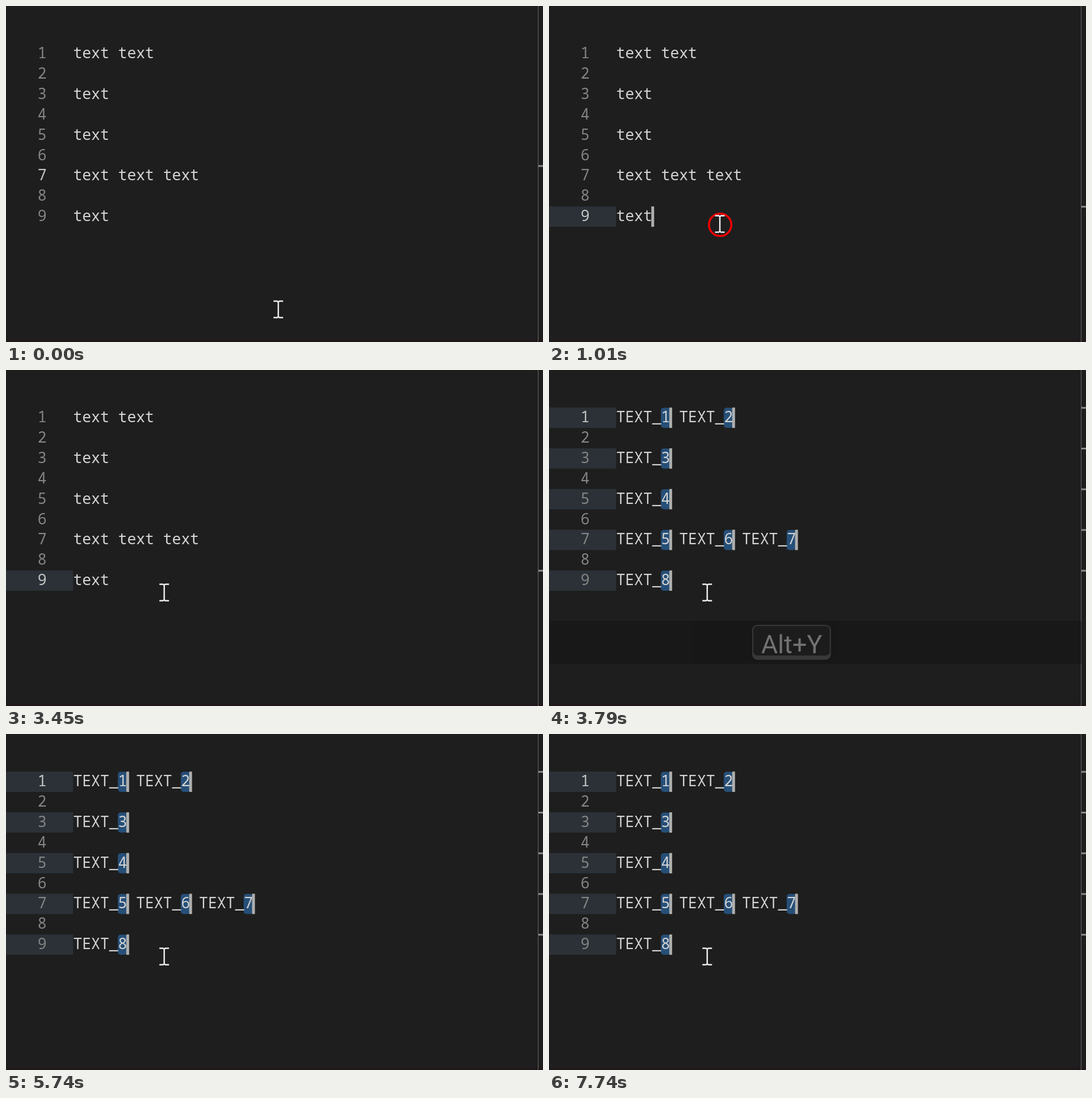
An HTML page that plays this animation: 946 by 592 pixels, repeating every 8 s.

```html
<!DOCTYPE html>
<html>
<head>
<meta charset="utf-8">
<style>
html, body { margin: 0; width: 100%; height: 100%; overflow: hidden; background: #1e1e1e; }
svg { display: block; }
text { white-space: pre; }
.code { font: 26.4px "Noto Sans Mono", monospace; fill: #d4d4d4; }
.num { fill: #858585; }
.active { fill: #c6c6c6; }
.caret { fill: #aeafad; }
.key { font: 45px Roboto, sans-serif; fill: #f0f0f0; text-anchor: middle; }
</style>
</head>
<body>
<svg width="946" height="592" viewBox="0 0 946 592">
  <rect y="588" width="946" height="4" fill="#21181c"/>
  <rect x="937" width="1" height="592" fill="#686868"/>
  <g id="idle"></g>
  <g id="focused"></g>
  <g id="numbered"></g>
  <g id="overlay">
    <rect y="442" width="938" height="75.5" fill="#0f0f0f"/>
    <rect x="358" y="449" width="138.5" height="61.5" rx="9" fill="#606060"/>
    <rect x="360" y="451" width="134.5" height="52" rx="7" fill="#1b1b1b"/>
    <text class="key" x="427.5" y="498.5">Alt+Y</text>
  </g>
  <circle id="click" cx="301.5" cy="385.5" r="19.7" fill="none" stroke="#f00000" stroke-width="3.6"/>
  <path id="pointer" d="M-8.5-14.5H-2L0-13 2-14.5H8.5M0-13V13M-8.5 14.5H-2L0 13 2 14.5H8.5" fill="none" stroke="#eee" stroke-width="2.5"/>
</svg>
<script>
const $ = id => document.getElementById(id);
const LEFT = 118.4, CHAR = 15.83, TOP = 66.2, LINE = 35.87;
const colX = col => LEFT + col * CHAR;
const lineY = i => TOP + i * LINE;

const rect = (x, y, w, h, attrs) => `<rect x="${x}" y="${y}" width="${w}" height="${h}" ${attrs}/>`;
const text = (x, y, cls, s) => `<text x="${x}" y="${y}" class="code ${cls}">${s}</text>`;

// marked: lines with a ruler mark; carets: [line, column] pairs
function editor(lines, { active, marked, lit, carets = [], selected }) {
  let out = '';
  lines.forEach((s, i) => {
    const y = lineY(i);
    if (marked.includes(i)) {
      out += rect(938, y - 1, 8, 3, 'fill="#8c8c8c"');
      if (lit) out += rect(0, y, 118.3, LINE, 'fill="#2b3137"');
    }
    out += text(55.7, y + 26, i === active ? 'active' : 'num', i + 1);
  });
  if (selected) for (const [i, col] of carets)
    out += rect(colX(col - 1) - .5, lineY(i) + .3, CHAR + .7, LINE - .3, 'rx="5" fill="#264f78"');
  lines.forEach((s, i) => { out += text(LEFT, lineY(i) + 26, '', s); });
  out += '<g class="caret">';
  for (const [i, col] of carets) out += rect(colX(col) - 1.5, lineY(i), 5, LINE, '');
  return out + '</g>';
}

const plain = ['text text', '', 'text', '', 'text', '', 'text text text', '', 'text'];
let count = 0;
const changed = plain.map(s => s.replace(/text/g, () => 'TEXT_' + ++count));
const ends = changed.flatMap((s, i) => [...s.matchAll(/\d/g)].map(m => [i, m.index + 1]));

$('idle').innerHTML = editor(plain, { active: 6, marked: [6] });
$('focused').innerHTML = editor(plain, { active: 8, marked: [8], lit: true, carets: [[8, 4]] });
$('numbered').innerHTML = editor(changed, { active: 0, marked: [0, 2, 4, 6, 8], lit: true, carets: ends, selected: true });

const show = (el, on) => el.setAttribute('visibility', on ? 'inherit' : 'hidden');
const blinks = [1470, 1930, 2460, 2920, 3450, 3720, 4280, 4810, 5270, 5740, 6270, 6730, 7280, 7740];

function pointerAt(t) {
  if (t >= 1270) return [278.7, 392];
  const step = t < 70 ? 0 : Math.min(7, Math.floor((t - 70) / 65) + 1) / 7;
  const p = step * step * (3 - 2 * step);
  return [479.7 - 178.7 * p, 534.5 - 150.5 * p];
}

function frame(now) {
  const t = now % 8000;
  const state = t < 1010 ? 'idle' : t < 3720 ? 'focused' : 'numbered';
  for (const id of ['idle', 'focused', 'numbered']) $(id).setAttribute('visibility', id === state ? 'visible' : 'hidden');
  const caretOn = blinks.filter(b => b <= t).length % 2 === 0;
  document.querySelectorAll('.caret').forEach(c => show(c, caretOn));
  show($('click'), t >= 920 && t < 1070);
  const fade = t < 3720 || t >= 4540 ? 0 : Math.min(1, (Math.floor((t - 3720) / 70) + 1) / 5);
  $('overlay').setAttribute('opacity', fade);
  $('pointer').setAttribute('transform', `translate(${pointerAt(t)})`);
  requestAnimationFrame(frame);
}
frame(0);
</script>
</body>
</html>
```
